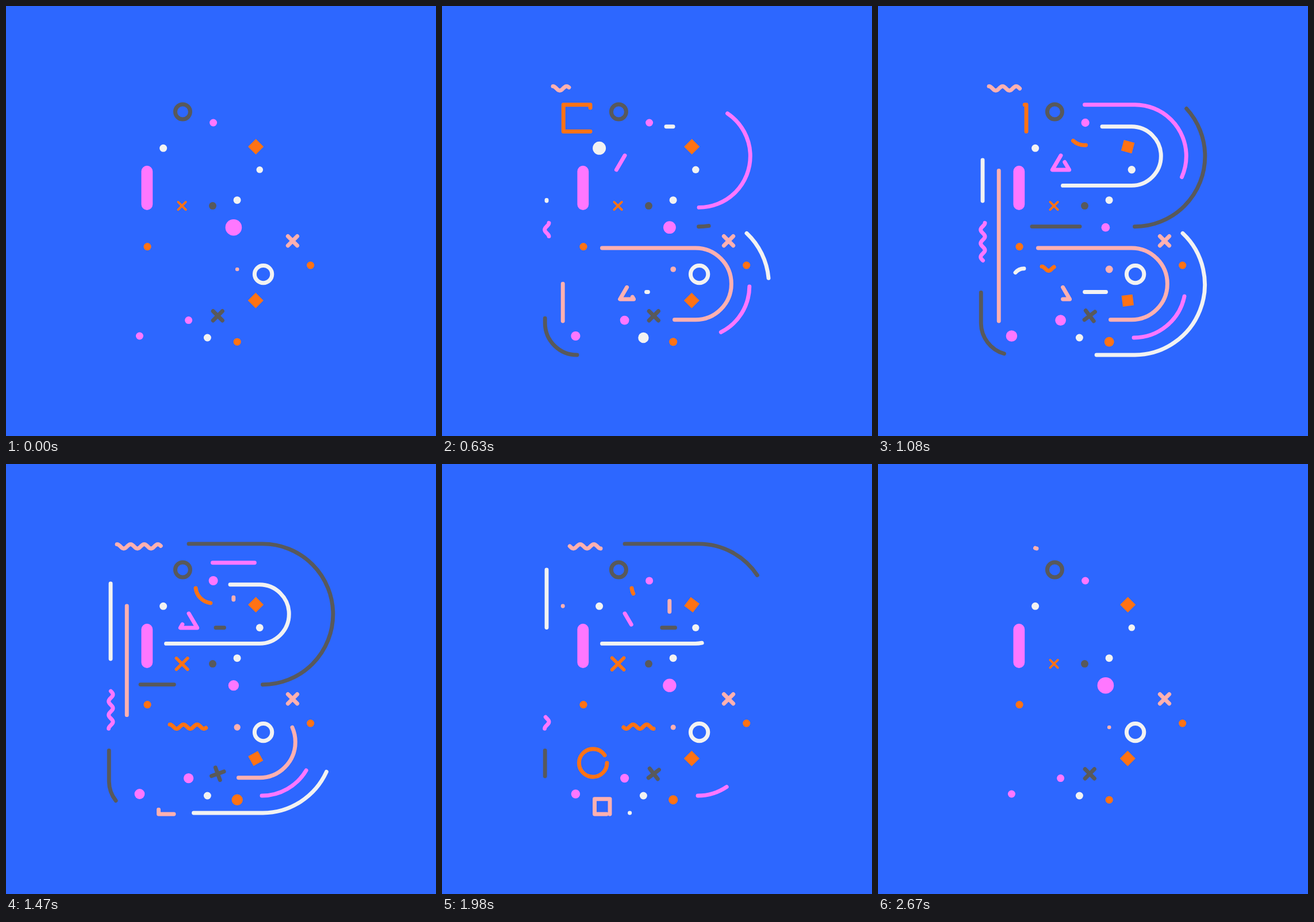
Write an HTML page that moves like this. It is 748 px wide and 748 px high and loops after 2700 ms.

```html
<!DOCTYPE html>
<html lang="en">
<head>
<meta charset="utf-8">
<title>Confetti letter B</title>
<style>
  html, body { margin: 0; width: 100%; height: 100%; overflow: hidden; background: #2d67ff; }
  svg { display: block; width: 100vw; height: 100vh; }
</style>
</head>
<body>
<svg id="stage" viewBox="0 0 748 748"></svg>
<script>
const LOOP = 2700, STEP = 30;
const ORANGE = '#ff7214', PINK = '#ff77ff', PEACH = '#ffb0b0', WHITE = '#f2f2f2', DARK = '#58595b';
const stage = document.getElementById('stage');
const updates = [];

function add(tag, attrs) {
  const node = document.createElementNS('http://www.w3.org/2000/svg', tag);
  for (const key in attrs) node.setAttribute(key, attrs[key]);
  stage.appendChild(node);
  return node;
}

const line = (color, d, width = 6.9) => add('path', {
  d, fill: 'none', stroke: color, 'stroke-width': width,
  'stroke-linecap': 'round', 'stroke-linejoin': 'round'
});

const ramp = (t, a, b) => Math.min(1, Math.max(0, (t - a) / (b - a)));

// Linear rise from a to peak, linear fall from peak to b.
const pulse = (t, a, peak, b) => t < peak ? ramp(t, a, peak) : 1 - ramp(t, peak, b);

// The head runs along the path from a to b, the tail follows from c to d.
function trim(color, d, a, b, c, end) {
  const node = line(color, d);
  const total = node.getTotalLength();
  updates.push(t => {
    const head = ramp(t, a, b) * total, tail = ramp(t, c, end) * total;
    const shown = head - tail > 0.05;
    node.setAttribute('visibility', shown ? 'visible' : 'hidden');
    if (!shown) return;
    node.setAttribute('stroke-dasharray', `${head - tail} ${total * 3}`);
    node.setAttribute('stroke-dashoffset', -tail);
  });
}

function wave(x, y, vertical) {
  const points = [];
  for (let i = 0; i <= 84; i++) {
    const along = i * 83 / 84, across = 3.7 * Math.cos(i / 84 * 7 * Math.PI);
    points.push(vertical ? `${x + across} ${y + along}` : `${x + along} ${y - across}`);
  }
  return 'M' + points.join('L');
}

function dot(color, x, y, r, peakR, times) {
  const node = add('circle', { cx: x, cy: y, r, fill: color });
  if (times) updates.push(t => node.setAttribute('r', r + (peakR - r) * pulse(t, ...times)));
}

const ring = (color, x, y, r) =>
  add('circle', { cx: x, cy: y, r, fill: 'none', stroke: color, 'stroke-width': 7 });

const cross = (color, arm, width) =>
  line(color, `M${-arm} ${-arm}L${arm} ${arm}M${arm} ${-arm}L${-arm} ${arm}`, width);

function place(node, x, y, angle = () => 0, scale = () => 1) {
  updates.push(t => node.setAttribute('transform',
    `translate(${x} ${y}) rotate(${angle(t)}) scale(${scale(t)})`));
}

const diamond = () => add('path', { d: 'M0 -13.5L13.5 0L0 13.5L-13.5 0Z', fill: ORANGE });

// Long strokes of the letter
trim(DARK, 'M446.5 383.7A122.4 122.4 0 0 0 446.5 138.9H318', 600, 1470, 1470, 2461);
trim(PINK, 'M447 350.4A89.3 89.3 0 0 0 447 171.8H359.5', 238, 872, 872, 1619);
trim(WHITE, 'M390 209.8H441A51.3 51.3 0 0 1 441 312.4H278.5', 613, 1141, 1692, 2230);
trim(PEACH, 'M278.5 421H441A62.4 62.4 0 0 1 441 545.8H404.5', 60, 600, 1110, 1717);
trim(PINK, 'M534.8 488A90 90 0 0 1 445 577', 93, 860, 860, 2670);
trim(WHITE, 'M530 395.3A122.5 122.5 0 0 1 447 607H326.5', 482, 1170, 1170, 1981);
trim(WHITE, 'M182 339V184', 620, 1625, 1625, 2635);
trim(PEACH, 'M210.2 548V247', 482, 1170, 1170, 1981);
trim(DARK, 'M235 607A55.7 55.7 0 0 1 179.2 552V498.5', 52, 902, 902, 2482);
trim(DARK, 'M351 383.6H234', 774, 1205, 1205, 1733);

// Squiggles
trim(PEACH, wave(193, 143.3), 150, 1590, 1590, 2700);
trim(PINK, wave(182.3, 377.3, true), 380, 1268, 1268, 2211);
trim(ORANGE, wave(285, 456.8), 876, 1665, 1675, 2490);

// Small outlines
trim(ORANGE, 'M258 218.3H211.2V171.8H258V218.3', 260, 735, 735, 1204);
trim(PEACH, 'M292 609H265.5V582.8H292V609', 1242, 1941, 1941, 2660);
trim(PINK, 'M318 260L303.3 285H332.7L318 260', 343, 1212, 1212, 2242);
trim(PEACH, 'M321.6 489.3L309.6 510H333.6L321.6 489.3', 170, 800, 800, 1360);
trim(ORANGE, 'M287 520A24.3 24.3 0 0 1 238.4 520A24.3 24.3 0 0 1 287 520', 1525, 2030, 2030, 2548);
trim(ORANGE, 'M361.5 242A29.6 29.6 0 0 1 330 216', 751, 1371, 1371, 2156);
trim(WHITE, 'M239 463.7A20 20 0 0 1 254 456.8', 800, 1080, 1080, 1440);

// Dashes
trim(PEACH, 'M395.8 232V257', 1400, 1836, 1836, 2411);
trim(DARK, 'M365 284.8H405.5', 1320, 1740, 1740, 2284);
trim(WHITE, 'M355.5 497.5H396.5', 599, 1037, 1037, 1465);

// Fixed parts
ring(DARK, 307.4, 184, 13);
ring(WHITE, 447.6, 466.6, 15.2);
line(PINK, 'M245.3 287.7V345', 19.8);

// Dots
const early = [230, 640, 1000], slow = [200, 1090, 2520];
dot(PINK, 360.6, 203, 6.5, 8, [800, 1470, 2000]);
dot(WHITE, 273.6, 247.3, 6.5, 11.6, early);
dot(WHITE, 441.3, 284.8, 5.8, 6.7, slow);
dot(WHITE, 402.1, 337.7, 6.5);
dot(DARK, 359.5, 347.6, 6.5);
dot(PINK, 395.9, 385.2, 14.3, 7.3, slow);
dot(ORANGE, 246, 418.6, 6.6);
dot(PEACH, 402.2, 458, 3.3, 6.5, slow);
dot(ORANGE, 529.7, 451.1, 6.5);
dot(PINK, 317.6, 546.6, 6.5, 9.4, slow);
dot(PINK, 232.4, 574, 6.5, 9.8, slow);
dot(WHITE, 350.4, 577, 6.5, 9.3, early);
dot(ORANGE, 402.2, 584.2, 6.5, 9.7, [480, 1500, 2400]);

// Turning and growing marks
place(diamond(), 434.6, 244.8, t => -30 * pulse(t, 760, 1080, 1400) - 34 * pulse(t, 1900, 2250, 2600));
place(diamond(), 434.3, 512.3, t => 38 * pulse(t, 640, 1080, 1750));
place(cross(PEACH, 8.1, 7), 498.5, 408.6);
place(cross(DARK, 8.1, 7), 368.3, 538.9, t => 25 * pulse(t, 900, 1470, 2200));
place(cross(ORANGE, 6.7, 3.8), 306.1, 347.6, () => 0, t => 1 + 0.77 * pulse(t, 1080, 1750, 2500));

function draw(ms) {
  const t = Math.floor(ms % LOOP / STEP) * STEP;
  updates.forEach(update => update(t));
}

let began;
function tick(now) {
  if (began === undefined) began = now;
  draw(Math.max(0, now - began));
  requestAnimationFrame(tick);
}
draw(0);
requestAnimationFrame(tick);
</script>
</body>
</html>
```
